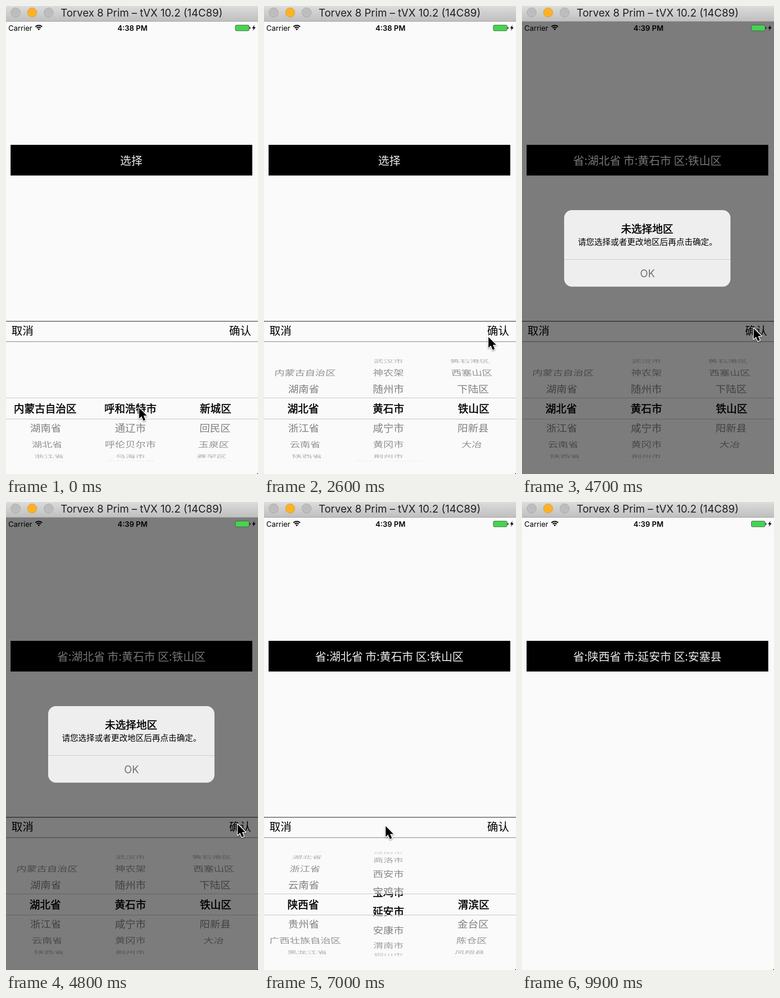
An HTML page with a canvas for the animation above (10 s loop, 550x1018 px).

```html
<!DOCTYPE html>
<html lang="zh">
<head>
<meta charset="utf-8">
<style>
html, body { margin: 0; width: 100%; height: 100%; overflow: hidden; background: #fafafa; }
canvas { display: block; }
</style>
</head>
<body>
<canvas id="stage" width="550" height="1018"></canvas>
<script>
const ctx = document.getElementById('stage').getContext('2d');
const CJK = '"Noto Sans CJK SC", "Noto Sans CJK", sans-serif';
const LATIN = 'Inter, Roboto, sans-serif';
const LOOP = 10000, STEP = 100;

const words = s => s.split(' ');
const provinces = words('内蒙古自治区 湖南省 湖北省 浙江省 云南省 陕西省 贵州省 广西壮族自治区 黑龙江省 甘肃省');
const cities = {
  内蒙古自治区: words('呼和浩特市 通辽市 呼伦贝尔市 乌海市 锡林郭勒盟'),
  湖北省: words('武汉市 神农架 随州市 黄石市 咸宁市 黄冈市 荆州市 恩施土家族苗族'),
  浙江省: words('绍兴市 湖州市 金华市 台州市 丽水市 温州市 衢州市 杭州市'),
  陕西省: words('咸阳市 商洛市 西安市 宝鸡市 延安市 安康市 渭南市 铜川市 汉中市')
};
const districts = {
  呼和浩特市: words('新城区 回民区 玉泉区 赛罕区 土默特左旗'),
  武汉市: words('江岸区 江汉区 硚口区 汉阳区 武昌区'),
  随州市: words('曾都区 广水'),
  黄石市: words('黄石港区 西塞山区 下陆区 铁山区 阳新县 大冶'),
  台州市: words('椒江区 黄岩区 路桥区 玉环县 三门县 天台县 仙居县 温岭市'),
  宝鸡市: words('渭滨区 金台区 陈仓区 凤翔县 岐山县'),
  延安市: words('宝塔区 延长县 延川县 子长县 安塞县 志丹县 吴起县')
};

// The user's actions; wheels, lists, label and cursor all follow from them.
const PROVINCE = 0, CITY = 1, DISTRICT = 2;
const SPIN = 500, DRAG = 300;
const flick = (time, wheel, rows, lift = 150) => ({ time, wheel, rows, lift });
const flicks = [
  flick(200, PROVINCE, 2),
  flick(700, CITY, 2),
  flick(1200, CITY, 1),
  flick(2000, DISTRICT, 3),
  flick(5200, PROVINCE, 1),
  flick(5710, PROVINCE, 2),
  flick(6210, DISTRICT, -3, -150),
  flick(6700, CITY, 1, 256),
  flick(7700, DISTRICT, 4)
];
const confirms = [2700, 8600], reopen = 3900, alertOpen = 4600, alertClose = 5100;

const stop = (time, x, y) => ({ time, x, y });
const dragStops = ({ time, wheel, lift }) => {
  const x = [117, 265, 458][wheel];
  return [stop(time, x, 832 + lift / 2), stop(time + DRAG, x, 832 - lift / 2)];
};
const cursorStops = [
  stop(0, 290, 873),
  ...flicks.flatMap(dragStops),
  ...[confirms[0], alertOpen, confirms[1]].map(time => stop(time, 505, 700)),
  stop(3600, 315, 333),
  stop(alertClose, 273, 580),
  stop(9300, 500, 640),
  stop(9800, 560, 30)
].sort((a, b) => a.time - b.time);

const clamp = u => Math.min(1, Math.max(0, u));
const ramp = (t, start, length) => clamp((t - start) / length);
const smooth = u => u * u * (3 - 2 * u);
const ease = (t, start, length) => smooth(ramp(t, start, length));

const turned = (wheel, progress) =>
  flicks.filter(f => f.wheel === wheel).reduce((sum, f) => sum + f.rows * progress(f), 0);
const position = (wheel, t) => turned(wheel, f => ease(t, f.time, SPIN));
const settled = (wheel, t) => turned(wheel, f => t >= f.time + SPIN ? 1 : 0);

function picker(t) {
  const province = provinces[settled(PROVINCE, t)];
  const city = cities[province][settled(CITY, t)];
  const district = districts[city][settled(DISTRICT, t)];
  return {
    lists: [provinces, cities[province], districts[city]],
    label: `省:${province} 市:${city} 区:${district}`
  };
}

function text(str, x, y, size, { color = '#000', weight = 400, family = CJK, align = 'center', thicken = 0 } = {}) {
  const baseline = y + size * (family === CJK ? 0.38 : 0.363);
  ctx.font = `${weight} ${size}px ${family}`;
  ctx.fillStyle = ctx.strokeStyle = color;
  ctx.textAlign = align;
  ctx.fillText(str, x, baseline);
  if (!thicken) return;
  ctx.lineWidth = thicken;
  ctx.strokeText(str, x, baseline);
}

function rect(x, y, w, h, color) {
  ctx.fillStyle = color;
  ctx.fillRect(x, y, w, h);
}

function polygon(points) {
  ctx.beginPath();
  points.forEach(([x, y]) => ctx.lineTo(x, y));
  ctx.closePath();
}

function clipped(y, h, draw) {
  ctx.save();
  ctx.beginPath();
  ctx.rect(0, y, 550, h);
  ctx.clip();
  draw();
  ctx.restore();
}

// Rows sit on a cylinder seen with slight perspective.
const RADIUS = 114, ROW_ANGLE = 0.379, DEPTH = 0.08, MID_X = 272, MID_Y = 875.6;

function wheel(rows, turn, x, selected) {
  rows.forEach((row, i) => {
    const angle = (i - turn) * ROW_ANGLE;
    if (Math.abs(angle) > 1.54) return;
    const sin = Math.sin(angle), cos = Math.cos(angle);
    const scale = 1 - DEPTH * (1 - cos), dx = x - MID_X;
    ctx.save();
    if (selected) {
      ctx.translate(x, MID_Y + RADIUS * sin);
    } else {
      ctx.globalAlpha = 0.51 * Math.pow(cos, 0.6);
      ctx.transform(scale, 0, -dx * DEPTH * sin / RADIUS, cos, MID_X + dx * scale, MID_Y + RADIUS * sin);
    }
    text(row, 0, 0, 22.8, { thicken: selected ? 0.6 : 0 });
    ctx.restore();
  });
}

function panel(t) {
  const closed = ease(t, confirms[0], 300) - ease(t, reopen, 300) + ease(t, confirms[1], 300);
  if (closed === 1) return;
  ctx.save();
  ctx.translate(0, 333 * closed);
  rect(0, 685, 550, 333, '#fafafa');
  rect(0, 685, 550, 1.5, '#505050');
  rect(0, 729.5, 550, 1.2, '#858585');
  text('取消', 12, 706, 24, { align: 'left' });
  text('确认', 535, 706, 24, { align: 'right' });
  const { lists } = picker(t);
  const wheels = selected => lists.forEach((rows, i) => wheel(rows, position(i, t), 85.5 + 186 * i, selected));
  clipped(757, 95, () => wheels(false));
  clipped(853, 45, () => wheels(true));
  clipped(899, 93, () => wheels(false));
  rect(0, 852, 550, 1, '#bcbcbc');
  rect(0, 898, 550, 1, '#bcbcbc');
  ctx.restore();
}

function alertBox(t) {
  const alpha = ramp(t, alertOpen, 100) - ramp(t, alertClose, 200);
  if (!alpha) return;
  ctx.save();
  ctx.globalAlpha = alpha;
  rect(0, 34, 550, 984, 'rgba(0,0,0,.5)');
  ctx.fillStyle = '#eeeeee';
  ctx.beginPath();
  ctx.roundRect(92, 444, 363, 166.5, 17);
  ctx.fill();
  rect(92, 551, 363, 1, '#c8c8ca');
  text('未选择地区', 273, 484, 22.8, { thicken: 0.6 });
  text('请您选择或者更改地区后再点击确定。', 274, 513, 17.9);
  text('OK', 274, 581.5, 22.5, { color: '#707276', family: LATIN });
  ctx.restore();
}

function titleBar() {
  const shade = ctx.createLinearGradient(0, 0, 0, 33);
  shade.addColorStop(0, '#dcdcdc');
  shade.addColorStop(1, '#bfbfbf');
  rect(0, 0, 550, 33, shade);
  rect(0, 33, 550, 1, '#9c9c9c');
  ['#bdbdbd', '#fdb124', '#bdbdbd'].forEach((fill, i) => {
    ctx.beginPath();
    ctx.arc(21 + 36 * i, 14, 10.3, 0, 7);
    ctx.fillStyle = fill;
    ctx.fill();
    ctx.lineWidth = 1;
    ctx.strokeStyle = 'rgba(0,0,0,.14)';
    ctx.stroke();
  });
  text('Torvex 8 Prim – tVX 10.2 (14C89)', 296, 15, 22.8, { color: '#202020', family: LATIN });
}

function statusBar(t) {
  text('Carrier', 5, 48, 16, { family: LATIN, align: 'left' });
  text(t < 3000 ? '4:38 PM' : '4:39 PM', 276, 48, 16, { family: LATIN, weight: 600 });

  const fan = r => ctx.arc(71.5, 52.5, r, -Math.PI * 0.75, -Math.PI * 0.25);
  ctx.strokeStyle = ctx.fillStyle = '#000';
  ctx.lineWidth = 2.3;
  [6.3, 10.3].forEach(r => {
    ctx.beginPath();
    fan(r);
    ctx.stroke();
  });
  ctx.beginPath();
  ctx.moveTo(71.5, 53);
  fan(3.4);
  ctx.fill();

  ctx.beginPath();
  ctx.roundRect(500.5, 41.5, 30, 12.5, 2.5);
  ctx.fillStyle = '#43d54f';
  ctx.fill();
  ctx.lineWidth = 0.9;
  ctx.strokeStyle = '#4a4a4a';
  ctx.stroke();
  rect(531.5, 45.5, 1.8, 4.5, '#222');
  polygon([[542.5, 41], [537, 48.5], [540.5, 48.5], [538.5, 54], [545, 46.3], [541.2, 46.3]]);
  ctx.fillStyle = '#000';
  ctx.fill();
}

// The cursor rests at each stop and leaves just in time for the next one.
function cursor(t) {
  const next = cursorStops.findIndex(s => s.time > t);
  if (next < 0) return;
  const a = cursorStops[next - 1], b = cursorStops[next];
  const travel = Math.min(DRAG, b.time - a.time);
  const u = ramp(t, b.time - travel, travel);
  ctx.save();
  ctx.translate(a.x + (b.x - a.x) * u, a.y + (b.y - a.y) * u);
  polygon([[0.5, 1], [0.5, 24.5], [5.8, 19.5], [9.8, 29], [14.2, 27.2], [10.2, 17.9], [17.4, 17.9]]);
  ctx.lineJoin = 'round';
  ctx.lineWidth = 3.2;
  ctx.strokeStyle = '#fff';
  ctx.shadowColor = 'rgba(0,0,0,.4)';
  ctx.shadowBlur = 3;
  ctx.shadowOffsetY = 1.5;
  ctx.stroke();
  ctx.shadowColor = 'transparent';
  ctx.fillStyle = '#000';
  ctx.fill();
  ctx.restore();
}

function button(t) {
  rect(10, 302, 527.5, 66.7, '#000');
  const confirmed = confirms.filter(time => time <= t).pop();
  const label = confirmed ? picker(confirmed).label : '选择';
  text(label, 273.5, 335.5, 24.4, { color: '#ececec', weight: 300 });
}

function draw(t) {
  rect(0, 0, 550, 1018, '#fafafa');
  button(t);
  panel(t);
  alertBox(t);
  titleBar();
  statusBar(t);
  polygon([[550, 1015.5], [550, 1018], [547.5, 1018]]);
  ctx.fillStyle = '#222';
  ctx.fill();
  cursor(t);
}

const start = performance.now();
function frame() {
  const elapsed = (performance.now() - start) % LOOP;
  draw(Math.floor(elapsed / STEP) * STEP);
  requestAnimationFrame(frame);
}
frame();
</script>
</body>
</html>
```
